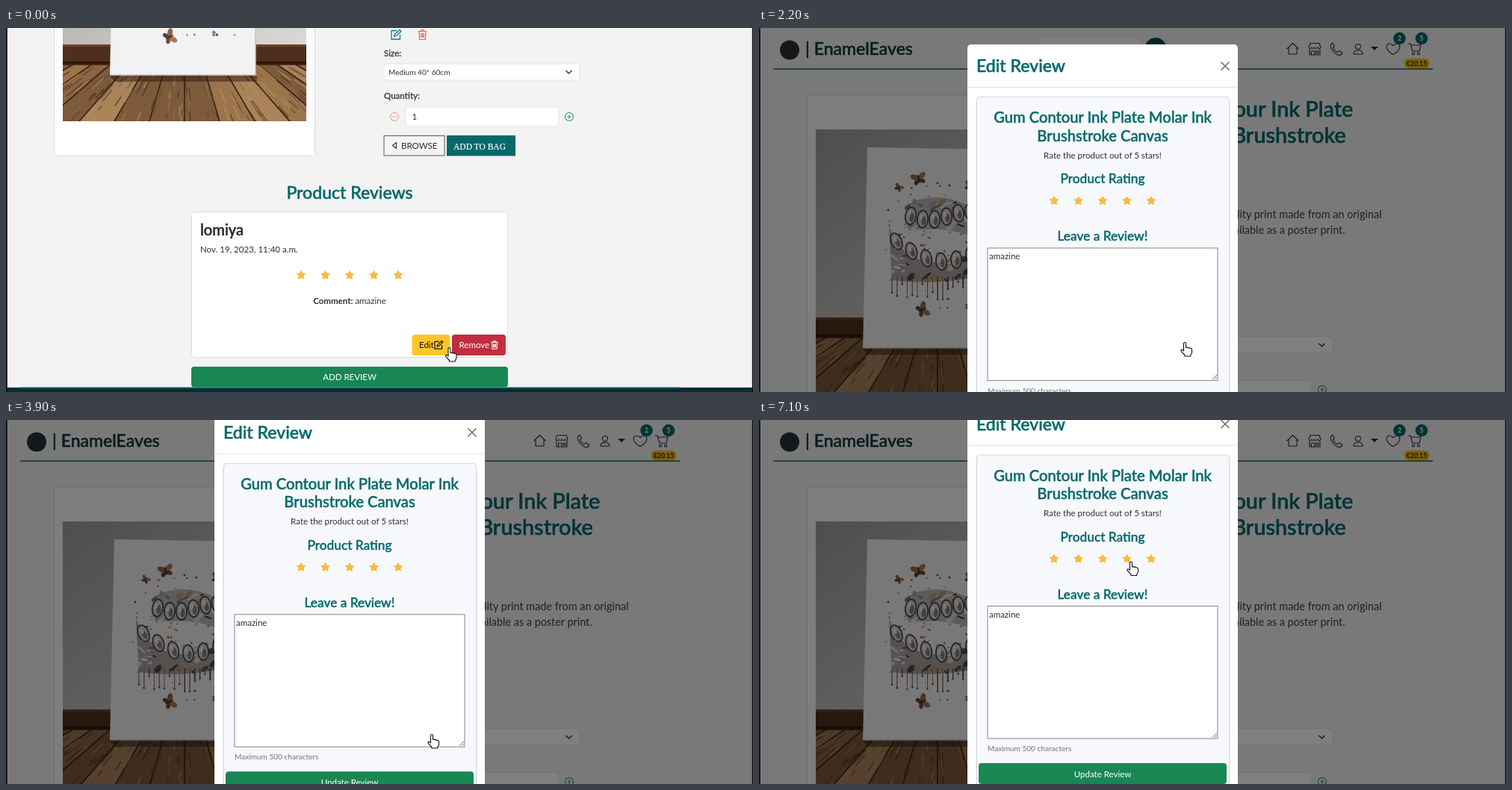
Write an HTML page that moves like this. It is 1000 px wide and 488 px high and loops after 7.2 s.

```html
<!DOCTYPE html>
<html lang="en">
<head>
<meta charset="utf-8">
<title>Edit review</title>
<style>
  html, body { margin: 0; width: 100%; height: 100%; overflow: hidden; background: #f3f3f4; }
  svg { display: block; width: 100%; height: 100%; font-family: Lato, sans-serif; }
  text { white-space: pre; }
</style>
</head>
<body>
<svg id="stage" viewBox="0 0 1000 488"></svg>
<script>
const LOOP = 7200, STEP = 100;
const TEAL = '#04696a', INK = '#2b3035', GREEN = '#198754';
const TITLE = ['Gum Contour Ink Plate', 'Molar Ink', 'Brushstroke', 'Canvas'];

// Drawing helpers: each returns SVG markup
const rect = (x, y, w, h, fill, more = '') =>
  `<rect x="${x}" y="${y}" width="${w}" height="${h}" fill="${fill}" ${more}/>`;
const circle = (x, y, r, fill, more = '') =>
  `<circle cx="${x}" cy="${y}" r="${r}" fill="${fill}" ${more}/>`;
const ellipse = (x, y, rx, ry, fill, turn = 0) =>
  `<ellipse rx="${rx}" ry="${ry}" fill="${fill}" transform="translate(${x} ${y}) rotate(${turn})"/>`;
const text = (x, y, s, size = 11.52, fill = INK, more = '') =>
  `<text x="${x}" y="${y}" font-size="${size}" fill="${fill}" ${more}>${s}</text>`;
const mid = 'text-anchor="middle"';
const head = (x, y, s, size, more = '', fill = TEAL) =>
  text(x, y, s, size, fill, `font-weight="500" stroke="${fill}" stroke-width="${size * .024}" ${more}`);
const line = (d, color, width = 1, more = '') =>
  `<path d="${d}" fill="none" stroke="${color}" stroke-width="${width}" ${more}/>`;
const icon = (x, y, d, color = INK, scale = 1, width = 1.1) =>
  `<g transform="translate(${x} ${y}) scale(${scale})">${line(d, color, width / scale, 'stroke-linejoin="round"')}</g>`;

const ICONS = {
  house: 'M-8 0L0-7.5 8 0M-5.5-2V7h11V-2',
  shop: 'M-8-2L-6-7.5H6L8-2q-2 3-4 0q-2 3-4 0q-2 3-4 0q-2 3-4 0zM-7 0V8H7V0M-4.5 8V3H0V8M2 3h3v3h-3z',
  phone: 'M-5-8q-5 3-1 9q4 6 9 7.5q3 .5 5-3l-4.5-3-2.5 2q-4-2-5.5-6l2-2z',
  person: 'M-3.5-3a3.5 3.5 0 1 1 7 0a3.5 3.5 0 1 1-7 0M-6 7q0-5 6-5t6 5z',
  heart: 'M0 7.5C-16-1-7-12 0-4.5C7-12 16-1 0 7.5z',
  cart: 'M-9-7h3l3 10h9l2-8H-5M-3.5 6.5a1.5 1.5 0 1 0 3 0a1.5 1.5 0 1 0-3 0M3.5 6.5a1.5 1.5 0 1 0 3 0a1.5 1.5 0 1 0-3 0',
  trash: 'M-5.5-4.5h11M-2-4.5v-2h4v2M-4.5-4.5l.7 11h7.6l.7-11M-1.7-2v6M0-2v6M1.7-2v6',
  edit: 'M1-5.5H-6V6H5.5V0M-2.5 2.5l1-3L5-6.5l2 2L.5 1.5z',
  minus: 'M-5.5 0a5.5 5.5 0 1 1 11 0a5.5 5.5 0 1 1-11 0M-2.7 0h5.4',
  plus: 'M-5.5 0a5.5 5.5 0 1 1 11 0a5.5 5.5 0 1 1-11 0M-2.7 0h5.4M0-2.7v5.4',
  chevron: 'M-4-2L0 2 4-2',
  cross: 'M-5.5-5.5L5.5 5.5M5.5-5.5L-5.5 5.5'
};

function star(cx, cy) {
  const pts = Array.from({ length: 10 }, (_, i) => {
    const a = i * Math.PI / 5, r = i % 2 ? 2.9 : 5.9;
    return `${(cx + r * Math.sin(a)).toFixed(2)},${(cy - r * Math.cos(a)).toFixed(2)}`;
  });
  return `<polygon points="${pts.join(' ')}" fill="#ffbd35" stroke="#eea72b" stroke-width=".8" stroke-linejoin="round"/>`;
}
const stars = y => [0, 1, 2, 3, 4].map(i => star(395 + 32.5 * i, y)).join('');

let seed = 11;
const rand = (a = 0, b = 1) => {
  seed = (seed * 16807) % 2147483647;
  return a + (b - a) * seed / 2147483647;
};
const pick = list => list[Math.floor(rand(0, list.length))];

function floor() {
  let s = rect(76, 415, 326, 77, '#7f5d3e');
  const at = (u, v) => 239 + u * (.92 + v * .83);
  for (let i = -9; i < 10; i++) {
    const u = i * 27, w = 27;
    s += `<path d="M${at(u, 0)} 415H${at(u + w, 0)}L${at(u + w, 1)} 492H${at(u, 1)}z" fill="${pick(['#9b744c', '#7d5a3a', '#ab835a', '#8b6542'])}" stroke="#3d2617" stroke-width="1.6"/>`;
  }
  for (let i = 0; i < 190; i++) {
    const u = rand(-190, 190), v = rand(0, .9), end = v + rand(.08, .3);
    s += line(`M${at(u, v)} ${415 + 77 * v}L${at(u, end)} ${415 + 77 * end}`, pick(['#4b301e', '#b9925f', '#64452c']), rand(.6, 2.2), 'opacity=".6"');
  }
  return s;
}

function butterfly(x, y, turn, size) {
  return `<g transform="translate(${x} ${y}) rotate(${turn}) scale(${size})">` +
    ellipse(-5, -3, 6, 3.5, '#94653f', 35) + ellipse(5, -3, 6, 3.5, '#a97850', -35) +
    ellipse(-4, 4, 4, 2.8, '#54453c', -35) + ellipse(4, 4, 4, 2.8, '#6b4f3d', 35) +
    ellipse(0, 0, 1, 6, '#2f2925') + '</g>';
}

function artwork() {
  const tones = ['#4f4c4e', '#77757a', '#a5a3a6', '#dedad6', '#c29a70', '#8f8b8c', '#eeebe8'];
  let s = '';
  for (let i = 0; i < 90; i++) {
    const a = rand(0, 6.28), r = Math.sqrt(rand()) * 1.2;
    s += circle(238 + 62 * r * Math.cos(a), 282 + 65 * r * Math.sin(a), rand(.4, 1.5), pick(['#59504c', '#a77a55', '#8b8788']));
  }
  s += '<path d="M198 237Q235 216 280 238L290 282Q250 264 200 272z" fill="#bdb9b6"/>';
  s += '<path d="M174 266Q190 312 235 314L290 302 300 332Q235 346 178 338z" fill="#a9a4a1"/>';
  for (let i = 0; i < 90; i++) {
    const upper = rand() < .45;
    s += ellipse(rand(upper ? 198 : 177, upper ? 288 : 298), upper ? rand(232, 272) : rand(300, 338), rand(2, 8), rand(1, 4), pick(tones), rand(-50, 50));
  }
  const tooth = (x, y, turn) => ellipse(x, y, 8, 12.5, '#4d494a', turn) + ellipse(x, y, 6.2, 10.5, '#d9d5d1', turn) +
    ellipse(x + 1.5, y + 2, 3, 6, '#86807e', turn) + ellipse(x - 2, y - 3, 2, 4, '#f2efed', turn);
  for (let i = 0; i < 6; i++) {
    s += tooth(203 + i * 16, 252 + 5 * Math.sin(i), 8 - i * 4);
    s += tooth(184 + i * 20, 286 + 27 * Math.sin(i * .5), -25 + i * 6);
  }
  for (let i = 0; i < 12; i++)
    s += circle(rand(178, 280), rand(275, 325), rand(1, 2), pick(['#c6533f', '#d8a04e']));
  for (let i = 0; i < 19; i++) {
    const x = 178 + i * 6.8, y = 336 + rand(2, 28);
    s += line(`M${x} 333V${y}`, pick(['#766355', '#4e4845', '#a07a5b']), rand(.8, 1.8)) + circle(x, y, 1.3, '#62554d');
  }
  for (let i = 0; i < 10; i++)
    s += ellipse(rand(238, 308), rand(362, 376), rand(1, 2.4), rand(.8, 2), pick(['#5c5452', '#b38a5e']));
  return s + butterfly(214, 202, -15, 1) + butterfly(187, 214, 30, .6) + butterfly(283, 212, 20, .8) + butterfly(219, 378, 65, 1);
}

const photo = () => `<g clip-path="url(#frame)">
  ${rect(76, 136, 326, 260, 'url(#wall)')}
  ${rect(76, 388, 326, 28, '#4f2e1d')}${rect(76, 388, 326, 3, '#6d432b')}${rect(76, 411, 326, 5, '#2a1810')}
  ${floor()}
  <path d="M138 430H336V438H146z" fill="#2c1b10" opacity=".5"/>
  <path d="M145 160L334 163V429L139 429z" fill="#f2f2f3"/>
  <path d="M334 163V429L139 429" fill="none" stroke="#c2c2c5" stroke-width="1.5"/>
  ${artwork()}</g>`;

const badge = (x, n) => circle(x, 14, 8.3, TEAL) + text(x, 17.2, n, 8.8, '#fff', `${mid} font-weight="700"`);

const navbar = () =>
  circle(41, 29.5, 13, INK) +
  head(62, 36, '| EnamelEaves', 23.04, '', '#0f3b3d') +
  rect(374, 13, 136, 29, '#fff', 'rx="4"') + text(453, 32, 'Search our site', 11.52, '#8b9095', 'text-anchor="end"') +
  circle(531, 27.5, 14.5, '#0f4a4c') + icon(531, 27.5, 'M-5-1a4 4 0 1 1 8 0a4 4 0 1 1-8 0M2 2l4 4', '#fff', 1, 1.5) +
  icon(714.5, 28, ICONS.house) + icon(744, 28, ICONS.shop) + icon(773, 28, ICONS.phone) + icon(802, 28, ICONS.person) +
  `<path d="M819 25h10l-5 5z" fill="${INK}"/>` +
  icon(849, 28, ICONS.heart) + icon(878, 28, ICONS.cart) + badge(857.5, 2) + badge(887, 5) +
  rect(864, 41, 33, 13, '#ffc107', 'rx="5"') + text(880.5, 50.7, '€20.15', 8.8, '#212529', `${mid} font-weight="700"`) +
  rect(19, 54.2, 883, 1.5, TEAL);

const details = () =>
  head(506, 119, TITLE[0], 28.8) + head(506, 153.5, `${TITLE[1]} ${TITLE[2]}`, 28.8) + head(506, 188, TITLE[3], 28.8) +
  head(506, 226.5, '€24.05', 17.28, '', '#444') +
  text(506, 255, 'The is a museum-quality print made from an original', 14.4, '#3c4146') +
  text(506, 276, 'painting. They are available as a poster print.', 14.4, '#3c4146') +
  rect(506, 289, 107, 26.5, '#0b5557', 'rx="4"') + text(515, 306, 'Add to wishlist', 11.52, '#fff') + icon(598, 302, ICONS.heart, '#fff', .65) +
  icon(511, 334, 'M-5-5h4v4h-4zM1-5h4v4H1zM-5 1h4v4h-4zM1 1h4v4H1z', '#6c757d', 1, .9) +
  text(518, 338, 'Wallart', 10.08, '#6c757d', 'text-decoration="underline"') +
  icon(522, 375, ICONS.edit, '#14788c', 1, 1.3) + icon(557.5, 375, ICONS.trash, '#e0624f', 1, 1.2) +
  head(506, 404, 'Size:', 11.52, '', '#3a3e42') +
  rect(506, 414, 262, 22, '#fff', 'stroke="#e2e4e7" rx="3"') + text(512, 428.5, 'Medium 40* 60cm', 10.08) + icon(753.5, 425, ICONS.chevron, '#343a40', 1, 1.5) +
  head(506, 461, 'Quantity:', 11.52, '', '#3a3e42') +
  icon(520, 485, ICONS.minus, '#e8a093') + rect(535, 472, 205, 26, '#fff', 'stroke="#e2e4e7" rx="3"') +
  text(543.5, 489, '1') + icon(754, 485, ICONS.plus, '#2b8f74') +
  rect(506, 510.5, 81, 26.5, '#f4f4f5', 'stroke="#55595d"') + icon(520, 523.5, 'M2.5-4V4L-2.5 0z', INK) + text(529, 527.7, 'BROWSE') +
  rect(590, 510, 92, 27.5, TEAL) +
  text(599, 529, 'ADD TO BAG', 11.52, '#fff', 'font-family="Liberation Serif, serif" stroke="#fff" stroke-width=".2"');

const reviews = () =>
  head(460, 595, 'Product Reviews', 23.04, mid) +
  rect(248.5, 612.5, 423, 195, '#fff', 'stroke="#dcdde0" rx="4"') +
  head(260, 644, 'lomiya', 20.16, '', '#24282c') +
  text(260, 667, 'Nov. 19, 2023, 11:40 a.m.') + stars(697.5) +
  text(460, 735.5, '<tspan font-weight="700">Comment:</tspan> amazine', 11.52, INK, mid) +
  rect(543.5, 777, 51, 28, '#ffc629', 'rx="4"') + text(553, 795, 'Edit', 11.52, '#111') + icon(579, 791, ICONS.edit, '#111', .85, 1.2) +
  rect(597, 777, 72, 28, '#dc3545', 'rx="4" id="remove"') + text(606.5, 795, 'Remove', 11.52, '#fff') + icon(654, 791, ICONS.trash, '#fff', .8) +
  rect(248, 820, 424, 27.5, GREEN, 'rx="4"') + text(460, 837.7, 'ADD REVIEW', 11.52, '#fff', mid) +
  rect(0, 848, 1000, 8, '#062d31') + rect(18, 847.5, 884, 1.8, TEAL);

const modal = () =>
  rect(279, 22, 362, 540, '#fff', 'rx="5"') +
  head(291, 59, 'Edit Review', 23.04) + icon(624, 51, ICONS.cross, '#6a6a6a', 1, 1.5) +
  rect(279, 79, 362, 1, '#dee2e6') +
  rect(290, 93, 341, 470, '#000', 'rx="6" opacity=".06"') +
  rect(291.5, 92.5, 338, 468, '#f7f8fc', 'stroke="#d5d7dc" rx="4"') +
  head(460, 127, `${TITLE[0]} ${TITLE[1]}`, 20.16, mid) + head(460, 151.5, `${TITLE[2]} ${TITLE[3]}`, 20.16, mid) +
  text(460, 174.7, 'Rate the product out of 5 stars!', 11.52, INK, mid) +
  head(460, 208, 'Product Rating', 17.28, mid) + stars(231.8) +
  head(460, 285, 'Leave a Review!', 17.28, mid) +
  rect(306, 295, 308, 177.5, '#fff', 'stroke="#858585"') + text(308, 310, 'amazine') +
  line('M607 471L613 465M610.5 471L613 468.5', '#666') +
  text(306, 489.7, 'Maximum 500 characters', 10.08, '#6c757d') +
  rect(294, 505.5, 332, 28, GREEN, 'rx="4"') + text(460, 524, 'Update Review', 11.52, '#fff', mid);

const HAND = 'M-1.5 11V1a1.5 1.5 0 0 1 3 0V6.5q1.8-.9 3 .4q1.8-.7 2.8.6q2-.3 2.2 1.7V13q-.3 2-1.7 3.2V18H0V16.5L-4.8 11.4q-.8-1.8.6-2.2q1.2 0 2.7 1.8z';
const ARROW = 'M0 0V12L2.7 9.5 4.7 13.8 6.7 12.9 4.8 8.7H8.2z';

const stage = document.getElementById('stage');
stage.innerHTML = `<defs>
    <clipPath id="frame">${rect(76, 136, 326, 355, '#000')}</clipPath>
    <linearGradient id="wall" x2="1" y2="1"><stop stop-color="#a19d9b"/><stop offset="1" stop-color="#dcdad8"/></linearGradient>
  </defs>
  ${rect(0, 0, 1000, 488, '#f3f3f4')}
  <g id="page">
    ${navbar()}
    ${rect(64.5, 89.5, 349, 448, '#fff', 'fill-opacity=".75" stroke="#d9dadd" rx="4"')}
    ${rect(65, 494, 348, 43, '#fff')}
    ${photo()}${details()}${reviews()}
  </g>
  ${rect(0, 0, 1000, 488, '#000', 'id="shade"')}
  <g id="modal">${modal()}</g>
  ${rect(0, 0, 1.8, 488, '#111')}${rect(998.8, 0, 1.2, 488, '#111')}
  <path id="cursor" fill="#fff" stroke="#111" stroke-width="1.1" stroke-linejoin="round"/>`;

const [page, shade, dialog, cursor, remove] =
  ['page', 'shade', 'modal', 'cursor', 'remove'].map(id => document.getElementById(id));
const place = (el, x, y) => el.setAttribute('transform', `translate(${x} ${y})`);

const linear = p => p;
const easeOut = p => 1 - (1 - p) ** 1.85;
const smooth = p => p * p * (3 - 2 * p);
const tween = (t, start, end, from, to, ease = linear) =>
  from + (to - from) * ease(Math.min(1, Math.max(0, (t - start) / (end - start))));

function draw(t) {
  place(page, 0, t < 1600 ? -366 : 0);
  shade.setAttribute('opacity', t < 1600 ? 0 : tween(t, 1550, 1750, 0, .5));
  dialog.setAttribute('opacity', tween(t, 1630, 1790, 0, 1));
  const drop = tween(t, 1620, 1920, -36, 0, easeOut);
  const scroll = tween(t, 2300, 2800, 0, -23, smooth) + tween(t, 3700, 4100, 0, -22.5, smooth);
  place(dialog, 0, drop + scroll);
  remove.setAttribute('fill', t < 100 ? '#c22e40' : '#dc3545');

  const late = t >= 4700;
  const arrow = late && t < 5500;
  cursor.setAttribute('d', arrow ? ARROW : HAND);
  if (late) place(cursor, tween(t, 4700, 5400, 518.5, 498, smooth), tween(t, 4700, 5400, 246, 190.5, smooth));
  else place(cursor, tween(t, 0, 600, 593.5, 570, smooth), tween(t, 0, 600, 429, 422, smooth));
}

const origin = performance.now();
function tick() {
  const t = (performance.now() - origin) % LOOP;
  draw(Math.floor(t / STEP) * STEP);
  requestAnimationFrame(tick);
}
draw(0);
requestAnimationFrame(tick);
</script>
</body>
</html>
```
